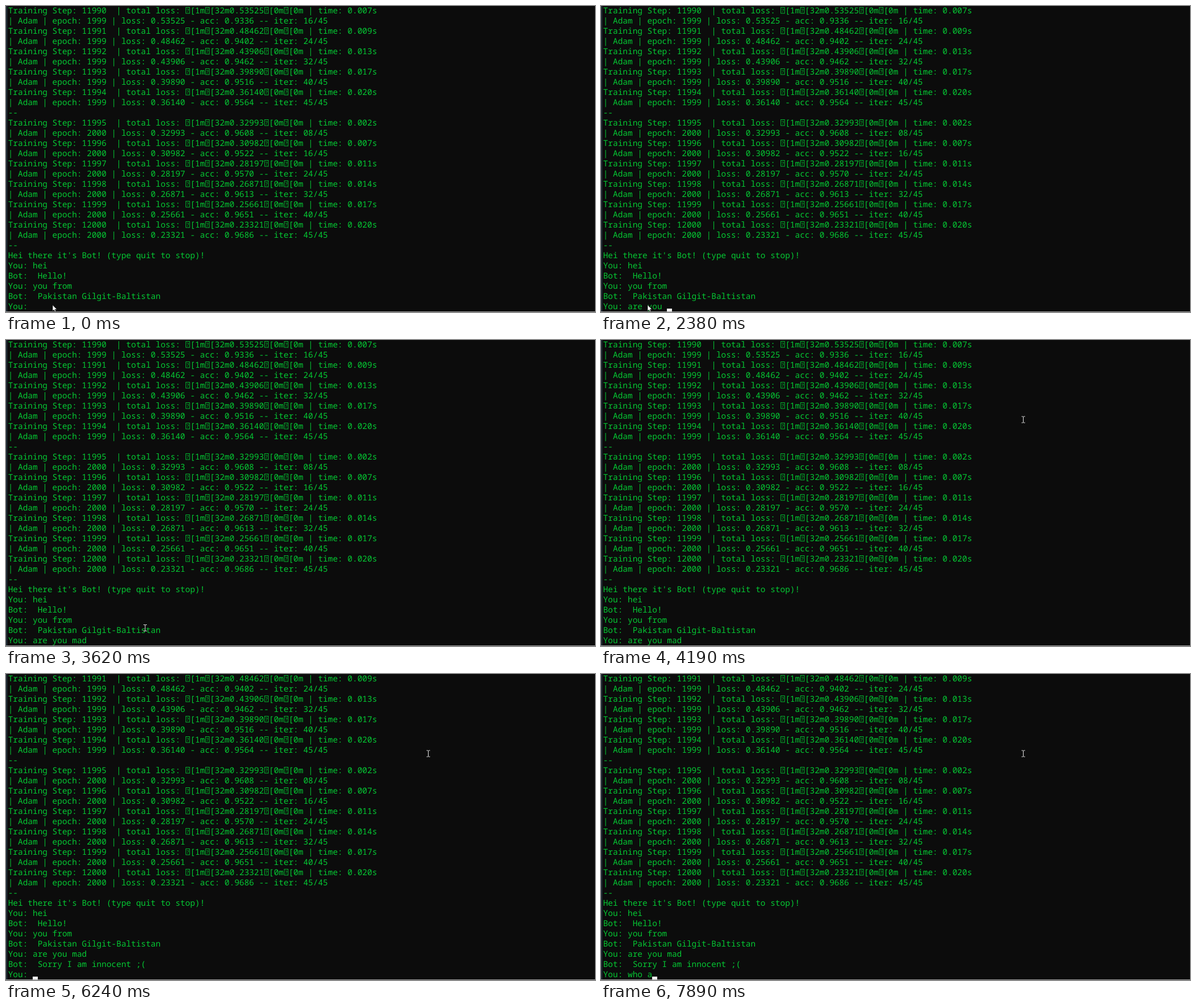
Write an HTML page that moves like this. It is 1037x540 px and loops after 8000 ms.

```html
<!DOCTYPE html>
<html lang="en">
<head>
<meta charset="utf-8">
<title>Chat bot terminal</title>
<style>
  html, body { margin: 0; height: 100%; overflow: hidden; background: #0c0c0c; }
  svg { display: block; width: 1037px; height: 540px; }
  text {
    font: 14.444px "Noto Sans Mono", monospace;
    fill: #05c833;
    white-space: pre;
    text-rendering: geometricPrecision;
  }
  .escape rect { fill: none; stroke: #05c833; stroke-width: .9; }
  .escape text { font-size: 8.5px; text-anchor: middle; }
</style>
</head>
<body>
<svg viewBox="0 0 1037 540">
  <rect width="1037" height="540" fill="#0c0c0c"/>
  <rect width="2.5" height="540" fill="#1f2a33"/>
  <g id="log"></g>
  <text id="prompt" x="3.67" y="535"></text>
  <rect id="caret" y="534" width="9" height="5" fill="#f2f2f2"/>
  <rect y="539" width="1037" height="1" fill="#a0a0a0"/>
  <path id="arrow" transform="translate(82 527.5)" fill="#fff" stroke="#000" stroke-width=".7"
    d="M0 0V10.8L2.5 8.6L4.2 12.4L6 11.6L4.4 8H7.8Z"/>
  <path id="beam" fill="none" stroke="#e8e8e8"
    d="M-3 -5.5H-.8L0 -5L.8 -5.5H3M0 -5V5M-3 5.5H-.8L0 5L.8 5.5H3"/>
</svg>
<script>
const LOOP = 8000, CELL = 26 / 3, LEFT = 3.67, ROW = 18, BASE = 13, ROWS = 29;
const SCROLL_AT = 4720;
const $ = id => document.getElementById(id);

// loss, accuracy, seconds, samples seen
const training = [
  ['0.53525', '0.9336', '0.007', '16'], ['0.48462', '0.9402', '0.009', '24'],
  ['0.43906', '0.9462', '0.013', '32'], ['0.39890', '0.9516', '0.017', '40'],
  ['0.36140', '0.9564', '0.020', '45'], ['0.32993', '0.9608', '0.002', '08'],
  ['0.30982', '0.9522', '0.007', '16'], ['0.28197', '0.9570', '0.011', '24'],
  ['0.26871', '0.9613', '0.014', '32'], ['0.25661', '0.9651', '0.017', '40'],
  ['0.23321', '0.9686', '0.020', '45'],
];

const lines = training.flatMap(([loss, acc, time, iter], i) => [
  `Training Step: ${11990 + i}  | total loss: ~[1m~[32m${loss}~[0m~[0m | time: ${time}s`,
  `| Adam | epoch: ${i < 5 ? 1999 : 2000} | loss: ${loss} - acc: ${acc} -- iter: ${iter}/45`,
  ...(iter === '45' ? ['--'] : []),
]).concat([
  "Hei there it's Bot! (type quit to stop)!",
  'You: hei', 'Bot:  Hello!',
  'You: you from', 'Bot:  Pakistan Gilgit-Baltistan',
  'You: are you mad', 'Bot:  Sorry I am innocent ;(',
]);

// "~" stands for an unprintable escape, shown as a boxed question mark
function drawLine(line, row) {
  const y = BASE + row * ROW;
  const boxes = [...line].map((char, col) => {
    if (char !== '~') return '';
    const x = LEFT + col * CELL;
    return `<g class="escape"><rect x="${x + 1}" y="${y - 10.5}" width="6.6" height="10.5"/>` +
      `<text x="${x + 4.3}" y="${y - 2.3}">?</text></g>`;
  }).join('');
  return `<text x="${LEFT}" y="${y}">${line.replaceAll('~', ' ')}</text>${boxes}`;
}
const screens = [0, 2].map(first => lines.slice(first, first + ROWS).map(drawLine).join(''));

// time, typed text, caret visible
const typing = [
  [0, '', 0], [540, '', 1], [840, 'a', 1], [990, 'ar', 1], [1110, 'are', 1],
  [1260, 'are ', 1], [1540, 'are yo', 1], [1820, 'are you', 1], [2100, 'are you', 0],
  [2380, 'are you ', 1], [2530, 'are you m', 1], [2650, 'are you ma', 1],
  [2770, 'are you mad', 1], [3070, 'are you mad', 0], [3625, 'are you mad', 1],
  [4190, 'are you mad', 0], [SCROLL_AT, '', 1], [5780, '', 0], [6240, '', 1],
  [6760, '', 0], [7290, '', 1], [7420, 'wh', 1], [7570, 'who', 1], [7890, 'who a', 1],
];

// time, x, y of the text pointer; before the first entry the arrow rests
const pointer = [
  [3360, 155.5, 531], [3500, 245, 508], [3625, 405, 445],
  [3750, 562.5, 358.5], [3890, 738, 139], [4040, 743.5, 140.5],
];

const latest = (steps, t) => steps.findLast(step => step[0] <= t);
const show = (node, on) => node.setAttribute('visibility', on ? 'visible' : 'hidden');
let shownScreen = -1;

function render(t) {
  const screen = t >= SCROLL_AT ? 1 : 0;
  if (screen !== shownScreen) $('log').innerHTML = screens[shownScreen = screen];

  const [, typed, caretOn] = latest(typing, t);
  $('prompt').textContent = 'You: ' + typed;
  $('caret').setAttribute('x', Math.round(LEFT + (5 + typed.length) * CELL));
  show($('caret'), caretOn);

  const beam = latest(pointer, t);
  show($('arrow'), !beam);
  show($('beam'), beam);
  if (beam) $('beam').setAttribute('transform', `translate(${beam[1]} ${beam[2]})`);
}

const start = performance.now();
function tick() {
  render((performance.now() - start) % LOOP);
  requestAnimationFrame(tick);
}
tick();
</script>
</body>
</html>
```
